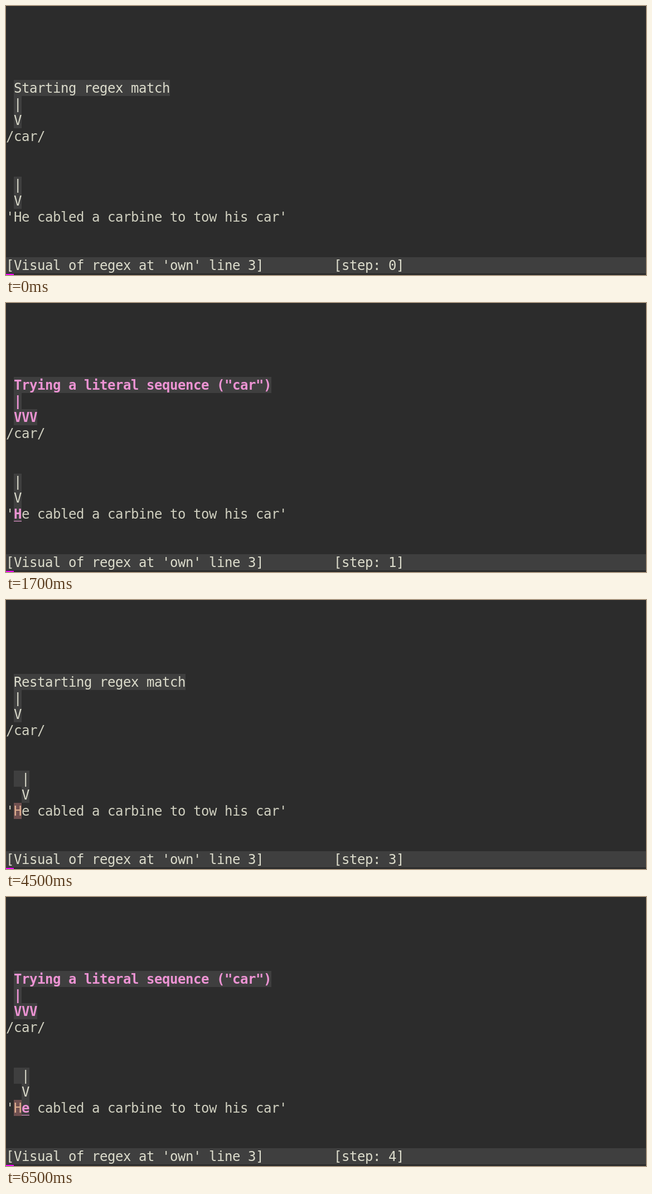
Animation of 1148x484 px, one loop 8000 ms. Source, as an HTML page with a canvas:

```html
<!DOCTYPE html>
<html lang="en">
<head>
<meta charset="utf-8">
<title>Regex match steps</title>
<style>
html, body { margin: 0; width: 100%; height: 100%; overflow: hidden; background: #2c2c2c; }
canvas { display: block; }
</style>
</head>
<body>
<canvas id="stage" width="1148" height="484"></canvas>
<script>
const ctx = document.getElementById('stage').getContext('2d');
const CELL = 14, ROW = 29, TOP = -12, ASCENT = 23, LOOP = 8000;
const FONT = '24px "DejaVu Sans Mono", monospace';

const PLAIN = { fg: '#d0d0c0' };
const INFO = { fg: '#dcdccc', bg: '#3f3f3f' };
const TRY = { fg: '#ec93d3', bg: '#3f3f3f', bold: true };
const FAIL = { fg: '#dfaf8f', bg: '#705050' };

const START = { label: 'Starting regex match', marker: 'V', style: INFO };
const RESTART = { label: 'Restarting regex match', marker: 'V', style: INFO };
const TRYING = { label: 'Trying a literal sequence ("car")', marker: 'VVV', style: TRY };
const FAILED = { label: 'Failed', marker: 'VVV', style: FAIL };

// at: start time, pos: place in the subject, tried: current character lit
const steps = [
  { at: 0, event: START, pos: 0 },
  { at: 500, event: TRYING, pos: 0, tried: true },
  { at: 2500, event: FAILED, pos: 0 },
  { at: 4500, event: RESTART, pos: 1 },
  { at: 6500, event: TRYING, pos: 1, tried: true }
];

const rowY = row => TOP + row * ROW;

function write(text, col, row, style, underline) {
  const x = col * CELL, y = rowY(row);
  if (style.bg) {
    ctx.fillStyle = style.bg;
    ctx.fillRect(x, y, text.length * CELL, ROW);
  }
  ctx.font = (style.bold ? 'bold ' : '') + FONT;
  ctx.fillStyle = style.fg;
  [...text].forEach((ch, i) => ctx.fillText(ch, x + i * CELL, y + ASCENT));
  if (underline) ctx.fillRect(x, y + 27, text.length * CELL, 1);
}

function drawPattern({ label, marker, style }) {
  write(label, 1, 5, style);
  write('|', 1, 6, style);
  write(marker, 1, 7, style);
  write('/car/', 0, 8, PLAIN);
}

function drawSubject(pos, tried) {
  const subject = 'He cabled a carbine to tow his car';
  const rest = pos + (tried ? 1 : 0);
  write(' '.repeat(pos) + '|', 1, 11, INFO);
  write('V', 1 + pos, 12, INFO);
  write("'", 0, 13, PLAIN);
  write(subject.slice(0, pos), 1, 13, FAIL);
  if (tried) write(subject[pos], 1 + pos, 13, TRY, true);
  write(subject.slice(rest) + "'", 1 + rest, 13, PLAIN);
}

function drawStatus(step) {
  ctx.fillStyle = INFO.bg;
  ctx.fillRect(0, rowY(16), 1148, ROW);
  write("[Visual of regex at 'own' line 3]", 0, 16, INFO);
  write(`[step: ${step}]`, 42, 16, INFO);
  ctx.fillStyle = '#f0f';
  ctx.fillRect(0, 482, CELL, 2);
}

function draw(time) {
  const index = steps.findLastIndex(s => s.at <= time);
  const { event, pos, tried } = steps[index];
  ctx.fillStyle = '#2c2c2c';
  ctx.fillRect(0, 0, 1148, 484);
  drawPattern(event);
  drawSubject(pos, tried);
  drawStatus(index);
}

function tick() {
  draw(performance.now() % LOOP);
  requestAnimationFrame(tick);
}
tick();
</script>
</body>
</html>
```
